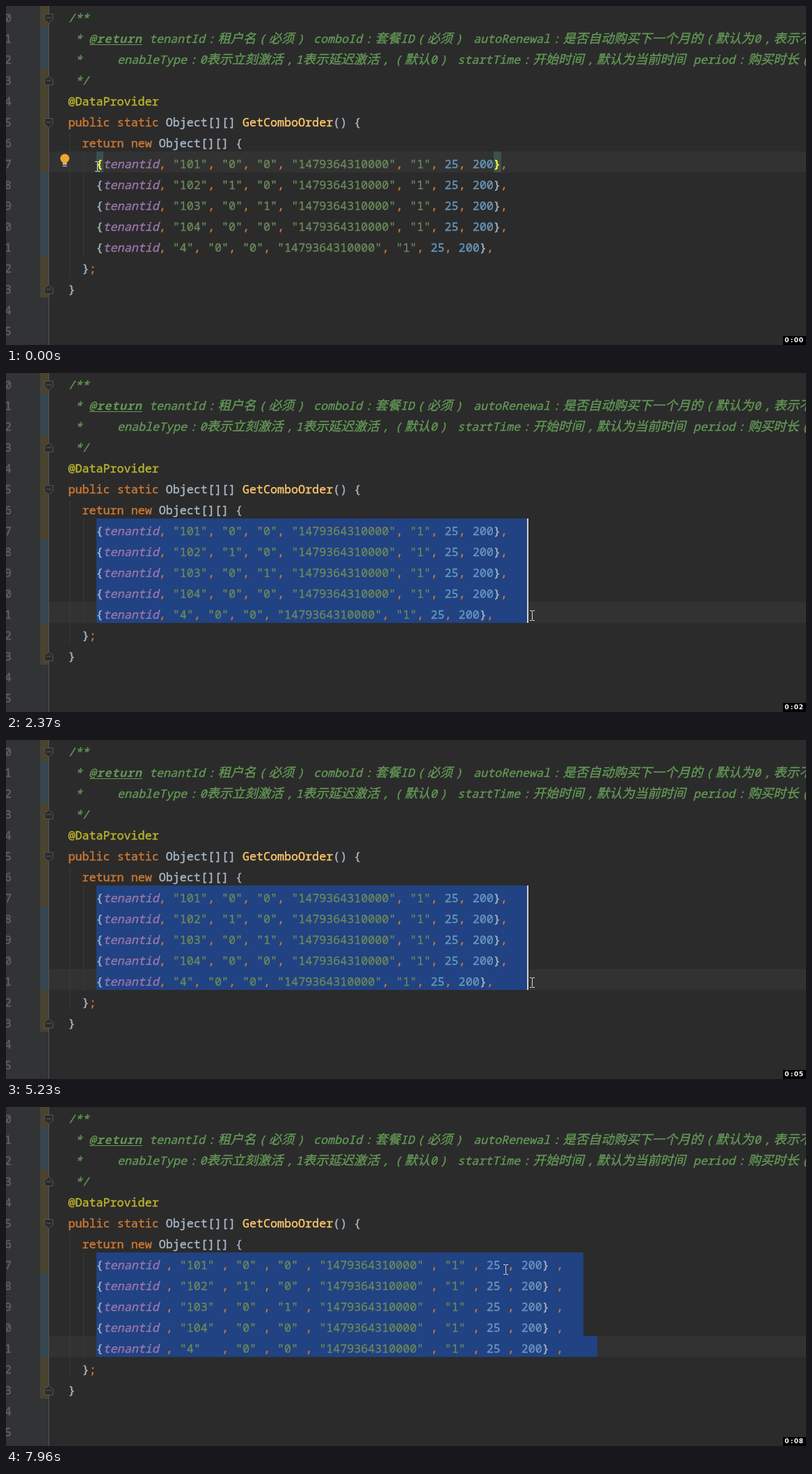
Write an HTML page with a canvas that moves like this. It is 1150 px wide and 487 px high and loops after 8 s.

```html
<!DOCTYPE html>
<html lang="zh">
<head>
<meta charset="utf-8">
<title>Column alignment</title>
<style>
html, body { margin: 0; width: 100%; height: 100%; overflow: hidden; background: #2b2b2b; }
canvas { display: block; }
</style>
</head>
<body>
<canvas id="stage" width="1150" height="487"></canvas>
<script>
const W = 1150, H = 487, LOOP = 8000;
const ctx = document.getElementById('stage').getContext('2d');

const MONO = '"Noto Sans Mono", "DejaVu Sans Mono", monospace';
const CJK = '"Noto Sans CJK SC", "Noto Sans CJK", sans-serif';
const UI = '"Open Sans", "Noto Sans", sans-serif';
const SIZE = 16.7, CELL = 10.02, WIDE = 18.3, LEFT = 89.5, ROW = 30;
const FIRST = 7; // row of the first data line
const CODE = `${SIZE}px ${MONO}`, LABEL = `13.75px ${MONO}`;

const C = {
  bg: '#2b2b2b', gutter: '#313335', line: '#323232', text: '#a9b7c6',
  key: '#cc7832', str: '#6a8759', num: '#6897bb', field: '#9876aa',
  doc: '#629755', note: '#bbb529', method: '#ffc66d', sel: '#214283',
  brown: '#49432f', blue: '#354650'
};

const rowTop = r => r * ROW - 1;
const baseline = r => rowTop(r) + 24;
const colX = c => LEFT + c * CELL;
const clamp = v => Math.max(0, Math.min(1, v));
const span = (t, a, b) => clamp((t - a) / (b - a));
const ease = u => u * u * (3 - 2 * u);
const within = (t, a, b) => t >= a && t < b;

function rect(g, x, y, w, h, fill) {
  g.fillStyle = fill;
  g.fillRect(x, y, w, h);
}

function text(g, s, x, y, font, fill, align = 'left') {
  g.font = font;
  g.fillStyle = fill;
  g.textAlign = align;
  g.fillText(s, x, y);
}

// Text with slightly heavier stems.
function ink(g, s, x, y, font, fill, align) {
  text(g, s, x, y, font, fill, align);
  g.strokeStyle = fill;
  g.lineWidth = .4;
  g.strokeText(s, x, y);
}

function box(g, x, y, w, h, r, fill, stroke, lw = 1) {
  g.beginPath();
  g.roundRect(x, y, w, h, r);
  if (fill) { g.fillStyle = fill; g.fill(); }
  if (stroke) { g.strokeStyle = stroke; g.lineWidth = lw; g.stroke(); }
}

function polygon(g, pts, fill, stroke) {
  g.beginPath();
  pts.forEach(([x, y]) => g.lineTo(x, y));
  g.closePath();
  g.fillStyle = fill;
  g.fill();
  g.strokeStyle = stroke;
  g.lineWidth = 1;
  g.stroke();
}

function gradient(g, x0, y0, x1, y1, ...colors) {
  const grad = g.createLinearGradient(x0, y0, x1, y1);
  colors.forEach((c, i) => grad.addColorStop(i / (colors.length - 1), c));
  return grad;
}

// ---- code ----

function tokenColor(s) {
  if (/^(public|static|return|new)$/.test(s) || /^[,;]$/.test(s)) return C.key;
  if (s[0] === '"') return C.str;
  if (s[0] === '@') return C.note;
  if (/^\d/.test(s)) return C.num;
  if (s === 'tenantid') return C.field;
  return s === 'GetComboOrder' ? C.method : C.text;
}

function codeLine(row, col, s) {
  for (const m of s.matchAll(/"[^"]*"|@?[A-Za-z]+|\d+|[^\s,;{}]+|\S/g)) {
    const style = m[0] === 'tenantid' ? 'italic ' : '';
    ink(ctx, m[0], colX(col + m.index), baseline(row), style + CODE, tokenColor(m[0]));
  }
}

// Full-width punctuation is set as a narrow mark centred in a wide cell.
function docLine(row, x, s) {
  const y = baseline(row);
  for (const run of s.match(/[\u2e80-\uffef]|[^\u2e80-\uffef]+/g)) {
    const code = run.charCodeAt(0);
    if (code > 0xff00) {
      ink(ctx, String.fromCharCode(code - 0xfee0), x + WIDE / 2, y, 'italic ' + CODE, C.doc, 'center');
    } else {
      const font = code > 0x2e7f ? `${WIDE}px ${CJK}` : CODE;
      ink(ctx, run, x, y, 'italic ' + font, C.doc);
    }
    x += code > 0x2e7f ? WIDE : run.length * CELL;
  }
}

const records = [['101', 0, 0], ['102', 1, 0], ['103', 0, 1], ['104', 0, 0], ['4', 0, 0]];

function dataLine([id, a, b], aligned) {
  const parts = ['{tenantid', `"${id}"`, `"${a}"`, `"${b}"`, '"1479364310000"', '"1"', '25', '200}'];
  if (!aligned) return parts.join(', ') + ',';
  parts[1] = parts[1].padEnd(5);
  return parts.join(' , ') + ' ,';
}

function drawDoc() {
  docLine(0, LEFT, '/**');
  docLine(1, colX(1), '*');
  ctx.letterSpacing = '0.85px';
  text(ctx, '@return', 119.5, baseline(1), 'italic bold ' + CODE, C.doc);
  ctx.letterSpacing = '0px';
  rect(ctx, 120, 55, 76, 1, C.doc);
  docLine(1, 206, 'tenantId：租户名（必须）');
  docLine(1, 442, 'comboId：套餐ID（必须）');
  docLine(1, 672, 'autoRenewal：是否自动购买下一个月的（默认为0，表示不');
  docLine(2, colX(1), '*');
  docLine(2, 160, 'enableType：0表示立刻激活，1表示延迟激活，（默认0）');
  docLine(2, 649, 'startTime：开始时间，默认为当前时间');
  docLine(2, 988, 'period：购买时长（');
  docLine(3, colX(1), '*/');
}

function foldMark(row, up) {
  const y = rowTop(row) + 18.5, d = up ? -1 : 1;
  polygon(ctx, [[55.5, y - 6 * d], [67.5, y - 6 * d], [67.5, y + 2 * d], [61.5, y + 7 * d], [55.5, y + 2 * d]], C.bg, '#555555');
  rect(ctx, 58, y - 1, 7, 1, '#606060');
}

function drawGutter() {
  rect(ctx, 0, 0, 61, H, C.gutter);
  [[0, 30, C.brown], [30, 90, C.blue], [90, 239, C.brown], [239, 360, C.blue], [360, 419, C.brown]]
    .forEach(([a, b, c]) => rect(ctx, 49, a, 12, b - a, c));
  rect(ctx, 61, 0, 1, H, '#555555');
  for (let r = 0; r < 16; r++) ink(ctx, String(r % 10), -2, baseline(r), CODE, '#606366');
}

function drawBulb() {
  ctx.fillStyle = '#f0a732';
  ctx.beginPath();
  ctx.arc(84.5, 219, 6.5, 0, Math.PI * 2);
  ctx.fill();
  rect(ctx, 81.5, 223, 6, 3, '#f0a732');
  rect(ctx, 81.5, 226, 6, 2, '#b9bcbe');
  rect(ctx, 81.5, 229, 6, 2, '#8d9092');
}

// ---- pointer ----

const drag = [[960, 131, 230], [1330, 532, 306], [1760, 700, 338], [2300, 756, 348]];

function dragPoint(t) {
  let p = drag[0].slice(1);
  for (let i = 1; i < drag.length; i++) {
    const [t0, x0, y0] = drag[i - 1], [t1, x1, y1] = drag[i];
    if (t >= t0) {
      const u = span(t, t0, t1);
      p = [x0 + (x1 - x0) * u, y0 + (y1 - y0) * u];
    }
  }
  return p;
}

function pointer(t) {
  if (t < 7290) return dragPoint(t);
  const u = ease(span(t, 7290, 7900));
  return [756 - 38 * u, 348 - 115 * u];
}

function drawBeam(x, y) {
  x = Math.round(x);
  y = Math.round(y);
  const c = '#d8d8d8';
  rect(ctx, x, y - 6, 1, 13, c);
  for (const dy of [-7, 7]) {
    rect(ctx, x - 3, y + dy, 3, 1, c);
    rect(ctx, x + 1, y + dy, 3, 1, c);
  }
}

function drawShape(pts, x, y) {
  polygon(ctx, pts.map(([a, b]) => [x + a, y + b]), '#fff', '#000');
}

const arrow = [[0, 0], [0, 13], [3, 10], [5, 15], [7, 14], [5, 9.5], [9, 9.5]];
const hand = [[0, 0], [2, 0], [3, 5], [6, 5.5], [10, 7.5], [10, 13], [8, 17], [2, 17], [-3, 11], [-3, 9], [0, 10]];

function drawPointer(t) {
  const [x, y] = pointer(t);
  if (within(t, 4000, 5210)) drawShape(hand, 754.5, 347.5);
  else if (within(t, 5440, 6360)) drawShape(arrow, 755.5, 347.5);
  else drawBeam(x, y);
}

// ---- dialog ----

function drawFrame(g) {
  g.shadowColor = 'rgba(0,0,0,.9)';
  g.shadowBlur = 12;
  g.shadowOffsetY = 2;
  box(g, 268, 67, 352, 153, 6, '#22282b');
  g.shadowColor = 'transparent';

  const glass = gradient(g, 268, 0, 620, 0, '#a3acb0', '#8b9498', '#465153', '#4b5756', '#7b8789', '#596366', '#70797c');
  box(g, 268, 67, 352, 24, [6, 6, 0, 0], glass);
  const side = gradient(g, 0, 90, 0, 135, '#a3acb0', '#6b7477', '#22282b');
  rect(g, 269, 90, 4, 45, side);
  rect(g, 615, 90, 4, 45, side);
  box(g, 269.5, 68.5, 349, 151, 5, null, 'rgba(205,218,224,.8)');
  box(g, 268.5, 67.5, 351, 153, 6, null, '#0c0e0f');
}

function button(g, x, w, label, weight, colors, edge) {
  box(g, x + .5, 174.5, w, 30, 3, gradient(g, 0, 174, 0, 205, ...colors), edge);
  ink(g, label, x + w / 2 + .5, 194, weight + LABEL, '#bbbbbb', 'center');
}

function makeDialog() {
  const c = document.createElement('canvas');
  c.width = W;
  c.height = H;
  const g = c.getContext('2d');
  drawFrame(g);

  rect(g, 274, 73, 11, 11, '#7a2a4a');
  g.shadowColor = 'rgba(255,255,255,.9)';
  g.shadowBlur = 7;
  g.shadowOffsetY = 0;
  text(g, 'Separator', 290, 82, '11px ' + UI, '#000');
  g.shadowColor = 'transparent';

  box(g, 576.5, 67.5, 38, 15, [0, 0, 4, 4], gradient(g, 0, 67, 0, 83, '#dfa294', '#c0432c', '#d5694b'), '#3b1714');
  g.strokeStyle = '#fff';
  g.lineWidth = 2;
  g.beginPath();
  g.moveTo(592.5, 71.5);
  g.lineTo(599, 77);
  g.moveTo(599, 71.5);
  g.lineTo(592.5, 77);
  g.stroke();

  box(g, 272.5, 89.5, 342, 127, 0, '#3c3f41', '#bfc9ce');
  box(g, 273.5, 90.5, 340, 125, 0, null, '#24282a');

  box(g, 287.5, 102.5, 31, 31, 5, gradient(g, 0, 102, 0, 134, '#8fcbe9', '#4da3d4', '#2f85ba'), '#6fb5da');
  text(g, '?', 303, 128, 'bold 27px ' + UI, '#fff', 'center');

  ink(g, 'Separator', 335.5, 113, LABEL, '#bbbbbb');
  box(g, 336.5, 123, 267, 28, 2, '#45494a', '#466d94', 2);
  rect(g, 345, 126, 9, 21, '#4b6eaf');
  ink(g, ',', 345, 142, LABEL, '#d0d0d0');

  button(g, 359, 78, 'OK', 'bold ', ['#384f6b', '#233143'], '#4c6a8d');
  button(g, 450, 79, 'Cancel', '', ['#555a5c', '#414648'], '#5f6466');
  return c;
}

const dialog = makeDialog();

function drawDialog(t) {
  const k = ease(span(t, 5380, 5630)) * (1 - ease(span(t, 6070, 6270)));
  if (k <= 0) return;
  const s = .93 + .07 * k;
  ctx.save();
  ctx.globalAlpha = k;
  ctx.translate(444, 144);
  ctx.scale(s, s);
  ctx.drawImage(dialog, -444, -144);
  ctx.restore();
  if (within(t, 5770, 5890)) rect(ctx, 353, 127, 1, 20, '#bbbbbb');
}

// ---- scene ----

const ticks = [960, 1960, 2980, 3980, 4960, 5890, 6850, 7800];

function drawClock(t) {
  rect(ctx, 1117, 474, 33, 13, '#000');
  const s = '0:0' + ticks.filter(v => t >= v).length;
  [1122.5, 1129.5, 1136, 1143].forEach((x, i) =>
    text(ctx, s[i], x, 483, 'bold 9px "DejaVu Sans", sans-serif', '#fff', 'center'));
}

function caretOn(t) {
  return within(t, 60, 2980) || within(t, 3440, 3930) || within(t, 5210, 5440) ||
    within(t, 6150, 7070) || within(t, 7500, 7940);
}

function draw(t) {
  const aligned = t >= 6150;
  const [mx, my] = dragPoint(t - 19);
  const last = Math.max(0, Math.min(4, Math.floor((my - rowTop(FIRST)) / ROW)));
  const cols = Math.max(0, Math.floor((mx - 130) / 10));
  const edge = i => 130 + 10 * (aligned ? (i < 4 ? 70 : 72) : cols);

  rect(ctx, 0, 0, W, H, C.bg);
  drawGutter();
  rect(ctx, 62, rowTop(FIRST + last), W - 62, ROW, C.line);
  rect(ctx, 91, 183, 1, 206, '#393939');
  rect(ctx, 111, 209, 1, 151, '#393939');
  for (let i = 0; cols && i <= last; i++) {
    rect(ctx, 130, rowTop(FIRST + i), edge(i) - 130, ROW, C.sel);
  }
  [[0, 0], [3, 1], [5, 0], [13, 1]].forEach(([r, up]) => foldMark(r, up));

  if (!cols) {
    rect(ctx, 130, 209, 10, ROW, '#3b514d');
    rect(ctx, 701, 209, 11, ROW, '#3b514d');
  }
  drawDoc();
  codeLine(4, 0, '@DataProvider');
  codeLine(5, 0, 'public static Object[][] GetComboOrder() {');
  codeLine(6, 2, 'return new Object[][] {');
  records.forEach((r, i) => codeLine(FIRST + i, 4, dataLine(r, aligned)));
  if (!cols) {
    text(ctx, '{', colX(4), baseline(FIRST), 'bold ' + CODE, '#ffef28');
    text(ctx, '}', colX(61), baseline(FIRST), 'bold ' + CODE, '#ffef28');
  }
  codeLine(12, 2, '};');
  codeLine(13, 0, '}');

  if (t < 60) drawBulb();
  if (caretOn(t)) {
    for (let i = 0; i <= last; i++) rect(ctx, edge(i) - 1, rowTop(FIRST + i), 2, ROW, '#d0d0d0');
  }
  drawDialog(t);
  drawPointer(t);
  drawClock(t);
}

const start = performance.now();
function frame() {
  draw((performance.now() - start) % LOOP);
  requestAnimationFrame(frame);
}
frame();
</script>
</body>
</html>
```
